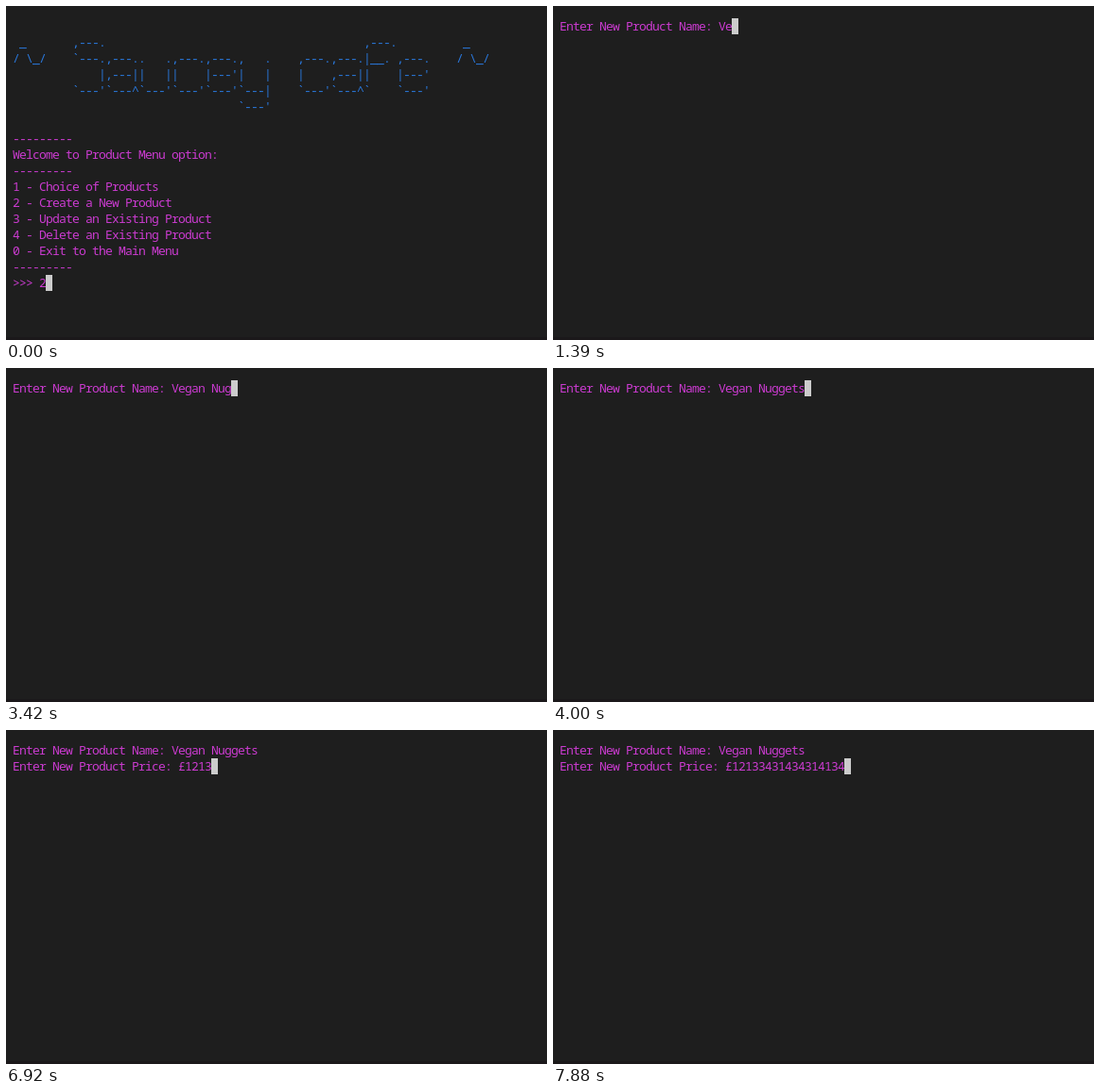
Animation, 572 px wide and 354 px high, one loop 8000 ms. Source, as an HTML page:

```html
<!DOCTYPE html>
<html lang="en">
<head>
<meta charset="utf-8">
<title>Product menu</title>
<style>
  html, body { margin: 0; width: 100%; height: 100%; overflow: hidden; background: #1e1e1e; }
  body { position: relative; box-sizing: border-box; border-bottom: 3px solid #1b181a; }
  pre {
    position: absolute; left: 7px; top: 13px; margin: 0;
    font: 13px/17px "Noto Sans Mono", "DejaVu Sans Mono", monospace;
    letter-spacing: calc(7px - 1ch);
    font-variant-ligatures: none;
    color: #cb3bd0;
  }
  .banner { color: #2a78dc; }
  .cursor { display: inline-block; width: 7px; height: 17px; vertical-align: top; background: #ccc; }
</style>
</head>
<body>
<pre id="menu"><span class="banner">&#32;
 _       ,---.                                       ,---.          _
/ \_/    `---.,---..   .,---.,---.,   .    ,---.,---.|__. ,---.    / \_/
             |,---||   ||    |---'|   |    |    ,---||    |---'
         `---'`---^`---'`---'`---'`---|    `---'`---^`    `---'
                                  `---'
</span>
---------
Welcome to Product Menu option:
---------
1 - Choice of Products
2 - Create a New Product
3 - Update an Existing Product
4 - Delete an Existing Product
0 - Exit to the Main Menu
---------
&gt;&gt;&gt; 2<span class="cursor"></span></pre>
<pre id="form" hidden><span id="typed"></span><span class="cursor"></span></pre>
<script>
const LOOP = 8000, FORM_AT = 270, TICK = 136;

// Bursts of output by start time; "|" separates what appears on each tick.
const bursts = {
  [FORM_AT]: "Enter New Product Name: ",
  1110: "V",
  1390: "e|g|a|n",
  2410: " ",
  2860: "N",
  3150: "u",
  3420: "g|ge",
  3860: "t|s",
  4440: "\nEnter New Product Price: ",
  5760: "£",
  6500: "1|2|1|3|34|31|43|43|14|13|4"
};

const menu = document.getElementById("menu");
const form = document.getElementById("form");
const typed = document.getElementById("typed");

function textAt(t) {
  return Object.entries(bursts).map(([start, keys]) =>
    keys.split("|").filter((_, i) => t >= +start + i * TICK).join("")
  ).join("");
}

function draw(now) {
  const t = now % LOOP;
  menu.hidden = t >= FORM_AT;
  form.hidden = !menu.hidden;
  const text = textAt(t);
  if (typed.textContent !== text) typed.textContent = text;
  requestAnimationFrame(draw);
}

draw(performance.now());
</script>
</body>
</html>
```
